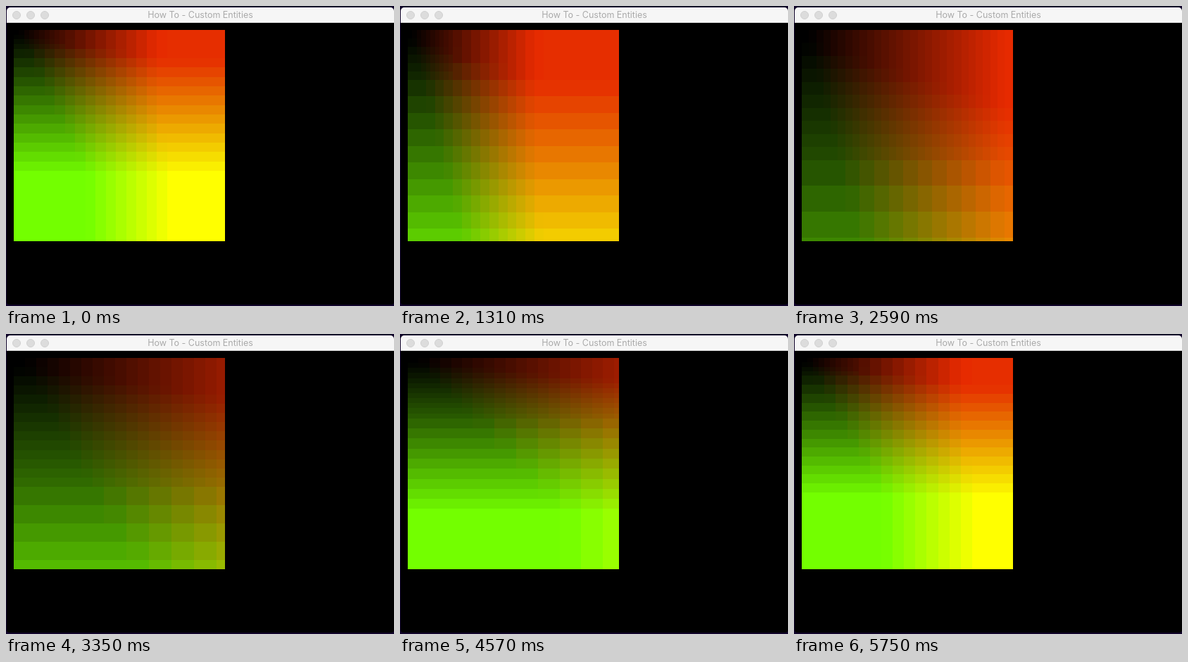
These frames come from a looping animation (551 by 426 pixels, 5.85 s). An HTML page with a canvas:

```html
<!DOCTYPE html>
<html lang="en">
<head>
<meta charset="utf-8">
<title>How To - Custom Entities</title>
<style>
  html, body { margin: 0; width: 100%; height: 100%; overflow: hidden; background: #10042a; }
  .window { position: absolute; left: 1px; top: 2px; width: 550px; height: 422px; background: #000; border-radius: 5px 5px 4px 4px; overflow: hidden; }
  .bar {
    position: absolute; left: 0; top: 0; width: 550px; height: 22px;
    box-sizing: border-box; border-bottom: 1px solid #d8d8d8; background: #f6f6f6;
    color: #aaa; font: 12.5px/22px Inter, Roboto, sans-serif; text-align: center;
  }
  .dot {
    position: absolute; top: 5px; width: 12px; height: 12px; box-sizing: border-box;
    border: 1px solid #d0d0d0; border-radius: 50%; background: #dcdcdc;
  }
  canvas { position: absolute; left: 10px; top: 32px; }
</style>
</head>
<body>
<div class="window">
  <div class="bar">
    <i class="dot" style="left:8px"></i>
    <i class="dot" style="left:28px"></i>
    <i class="dot" style="left:48px"></i>
    How To - Custom Entities
  </div>
  <canvas id="square" width="300" height="300"></canvas>
</div>
<script>
const SIZE = 300, LEVELS = 16;
const LOOP = 5850, LAST = 5750;
const PHASE = 0.622, SPEED = 1.042; // radians, radians per second
const ctx = document.getElementById('square').getContext('2d');
const clamp = (v, lo, hi) => Math.min(hi, Math.max(lo, v));

// Display colour: each channel is limited by the other one.
function colour(r, g) {
  r = clamp(r, 0, 1);
  g = clamp(g, 0, 1);
  const red = clamp(r, 0.45 * g, 0.9 + 0.1 * g ** 3);
  const green = Math.max(g, 0.18 * r);
  return `rgb(${Math.round(red * 255)},${Math.round(green * 255)},0)`;
}

const edge = (level, scale) =>
  level >= LEVELS ? SIZE : Math.min(SIZE, Math.round(level / LEVELS * SIZE / scale));

function cell(i, j, step, sx, sy) {
  const x = edge(i, sx), y = edge(j, sy);
  const w = edge(i + step, sx) - x, h = edge(j + step, sy) - y;
  if (w <= 0 || h <= 0) return;
  const shift = step < 1 ? 0.25 : 0;
  const tone = k => (k - (k % 1 ? shift : k ? shift : 0)) / (LEVELS - 1);
  ctx.fillStyle = colour(tone(i), tone(j));
  ctx.fillRect(x, y, w, h);
}

function draw(ms) {
  const a = PHASE + SPEED * Math.min(ms, LAST) / 1000;
  const sx = 1 + Math.sin(a) / 2, sy = 1 + Math.cos(a) / 2;

  // Dark tones get half steps when few levels are in use.
  const cols = Math.min(LEVELS, LEVELS * sx), rows = Math.min(LEVELS, LEVELS * sy);
  const fineRows = Math.round(1 + (256 - 0.75 * cols * rows) / 3 / cols);
  const fineCols = cols < LEVELS ? LEVELS : 5;

  for (let j = 0; j < rows; j++) {
    for (let i = 0; i < cols; i++) {
      const step = j < fineRows && i < fineCols ? 0.5 : 1;
      for (let v = 0; v < 1; v += step)
        for (let u = 0; u < 1; u += step) cell(i + u, j + v, step, sx, sy);
    }
  }
}

const start = performance.now();
function tick() {
  draw((performance.now() - start) % LOOP);
  requestAnimationFrame(tick);
}
tick();
</script>
</body>
</html>
```
